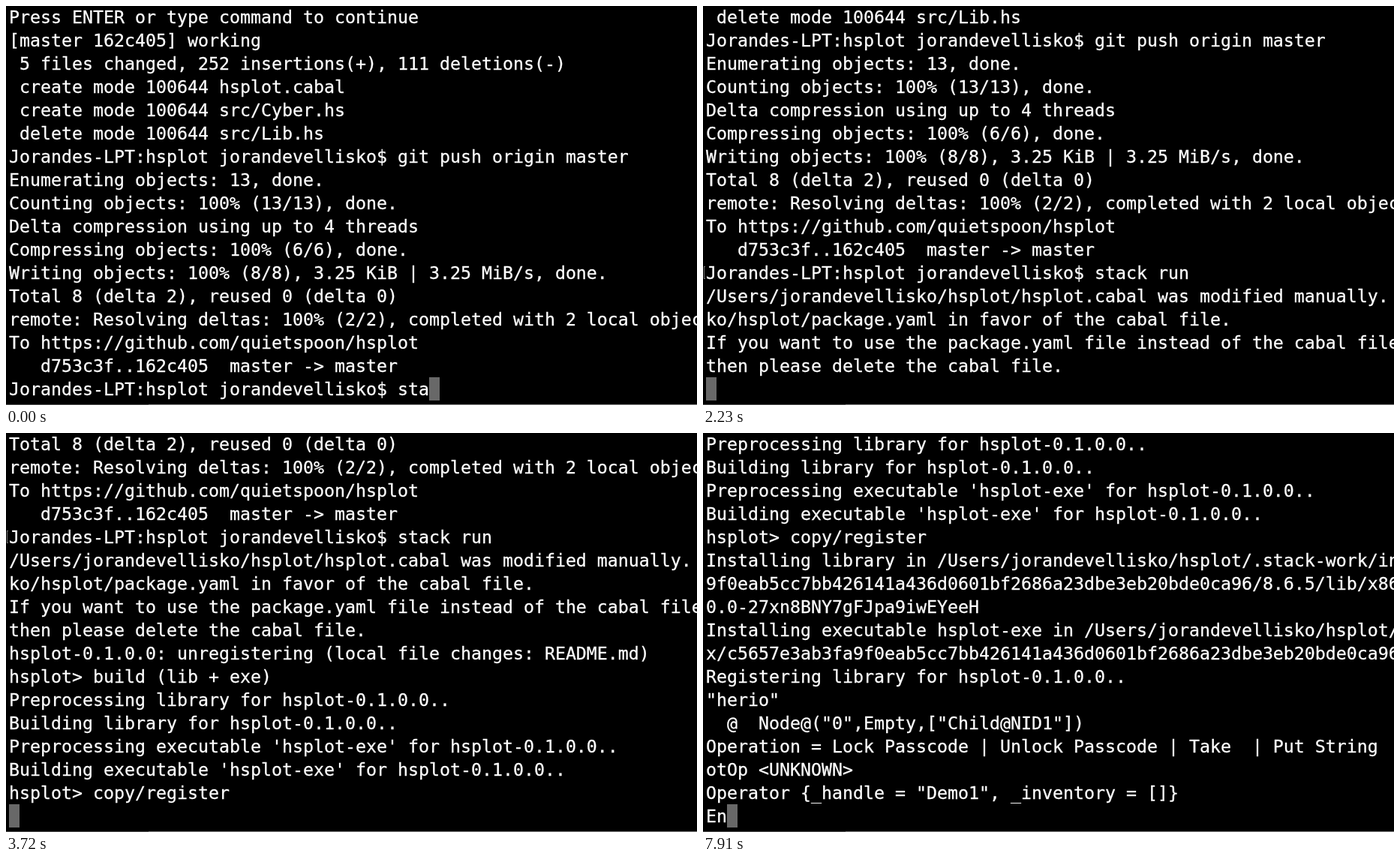
Recreate the animation shown at these times as an HTML page. Size 921x532 px, loop 8 s.

```html
<!DOCTYPE html>
<html lang="en">
<head>
<meta charset="utf-8">
<title>Terminal</title>
<style>
html, body { margin: 0; width: 100%; height: 100%; overflow: hidden; background: #000; }
#term { position: relative; width: 921px; height: 532px; overflow: hidden; background: #000; }
#text {
  position: absolute; left: 4px; top: -1px; margin: 0; color: #fff;
  font: 23.25px/31px "DejaVu Sans Mono", monospace;
  font-variant-ligatures: none; white-space: pre;
  -webkit-text-stroke: .3px #fff;
}
#cursor { position: absolute; top: 495px; width: 14px; height: 31px; background: #686868; }
#mark {
  position: absolute; left: 1px; width: 2px; height: 17px;
  border: 1px solid #777; border-right: 0; box-sizing: border-box;
}
#edge {
  position: absolute; left: 0; right: 0; bottom: 0; height: 1px;
  background: linear-gradient(90deg, #4a4a4a 190px, #7c7c7c 190px);
}
</style>
</head>
<body>
<div id="term">
  <div id="cursor"></div>
  <pre id="text"></pre>
  <div id="mark"></div>
  <div id="edge"></div>
</div>
<script>
const LOOP = 8000, ROWS = 16, CELL = 14, LINE = 31;
const user = 'jorandevellisko';
const prompt = `Jorandes-LPT:hsplot ${user}$ `;
const home = `/Users/${user}/hsplot`;
const pkg = 'hsplot-0.1.0.0';
const hash = '9f0eab5cc7bb426141a436d0601bf2686a23dbe3eb20bde0ca96';

const log = `Press ENTER or type command to continue
[master 162c405] working
 5 files changed, 252 insertions(+), 111 deletions(-)
 create mode 100644 hsplot.cabal
 create mode 100644 src/Cyber.hs
 delete mode 100644 src/Lib.hs
${prompt}git push origin master
Enumerating objects: 13, done.
Counting objects: 100% (13/13), done.
Delta compression using up to 4 threads
Compressing objects: 100% (6/6), done.
Writing objects: 100% (8/8), 3.25 KiB | 3.25 MiB/s, done.
Total 8 (delta 2), reused 0 (delta 0)
remote: Resolving deltas: 100% (2/2), completed with 2 local objects.
To https://github.com/quietspoon/hsplot
   d753c3f..162c405  master -> master
${prompt}stack run
${home}/hsplot.cabal was modified manually.
${user.slice(-2)}/hsplot/package.yaml in favor of the cabal file.
If you want to use the package.yaml file instead of the cabal file,
then please delete the cabal file.
${pkg}: unregistering (local file changes: README.md)
hsplot> build (lib + exe)
Preprocessing library for ${pkg}..
Building library for ${pkg}..
Preprocessing executable 'hsplot-exe' for ${pkg}..
Building executable 'hsplot-exe' for ${pkg}..
hsplot> copy/register
Installing library in ${home}/.stack-work/install
${hash}/8.6.5/lib/x86_64
0.0-27xn8BNY7gFJpa9iwEYeeH
Installing executable hsplot-exe in ${home}/.stack
x/c5657e3ab3fa${hash}
Registering library for ${pkg}..
"herio"
  @  Node@("0",Empty,["Child@NID1"])
Operation = Lock Passcode | Unlock Passcode | Take  | Put String
otOp <UNKNOWN>
Operator {_handle = "Demo1", _inventory = []}`.split('\n');
const RUN_LINE = 16;

// [start ms, lines scrolled off, text on the input line]
const steps = [
  [0, 0, prompt + 'sta'],
  [300, 0, prompt + 'stac'],
  [450, 0, prompt + 'stack'],
  [600, 0, prompt + 'stack '],
  [750, 0, prompt + 'stack r'],
  [890, 0, prompt + 'stack ru'],
  [1040, 0, prompt + 'stack run'],
  [1190, 0, prompt + 'stack run '],
  [1780, 0, prompt + 'stack run'],
  [2080, 1, ''],
  [2230, 5, ''],
  [2530, 6, ''],
  [2680, 9, ''],
  [3270, 11, ''],
  [3720, 12, ''],
  [3870, 18, ''],
  [4170, 23, ''],
  [7610, 23, 'E'],
  [7910, 23, 'En']
];

const [text, cursor, mark] = ['text', 'cursor', 'mark'].map(id => document.getElementById(id));
let shown;

function draw(step) {
  const [, top, input] = step;
  text.textContent = [...log.slice(top, top + ROWS), input].join('\n');
  cursor.style.left = 4 + input.length * CELL + 'px';
  const row = RUN_LINE - top;
  mark.hidden = row < 0 || row >= ROWS;
  mark.style.top = row * LINE + 6 + 'px';
}

function tick() {
  const t = performance.now() % LOOP;
  const step = steps.findLast(s => s[0] <= t);
  if (step !== shown) draw(shown = step);
  requestAnimationFrame(tick);
}
tick();
</script>
</body>
</html>
```
